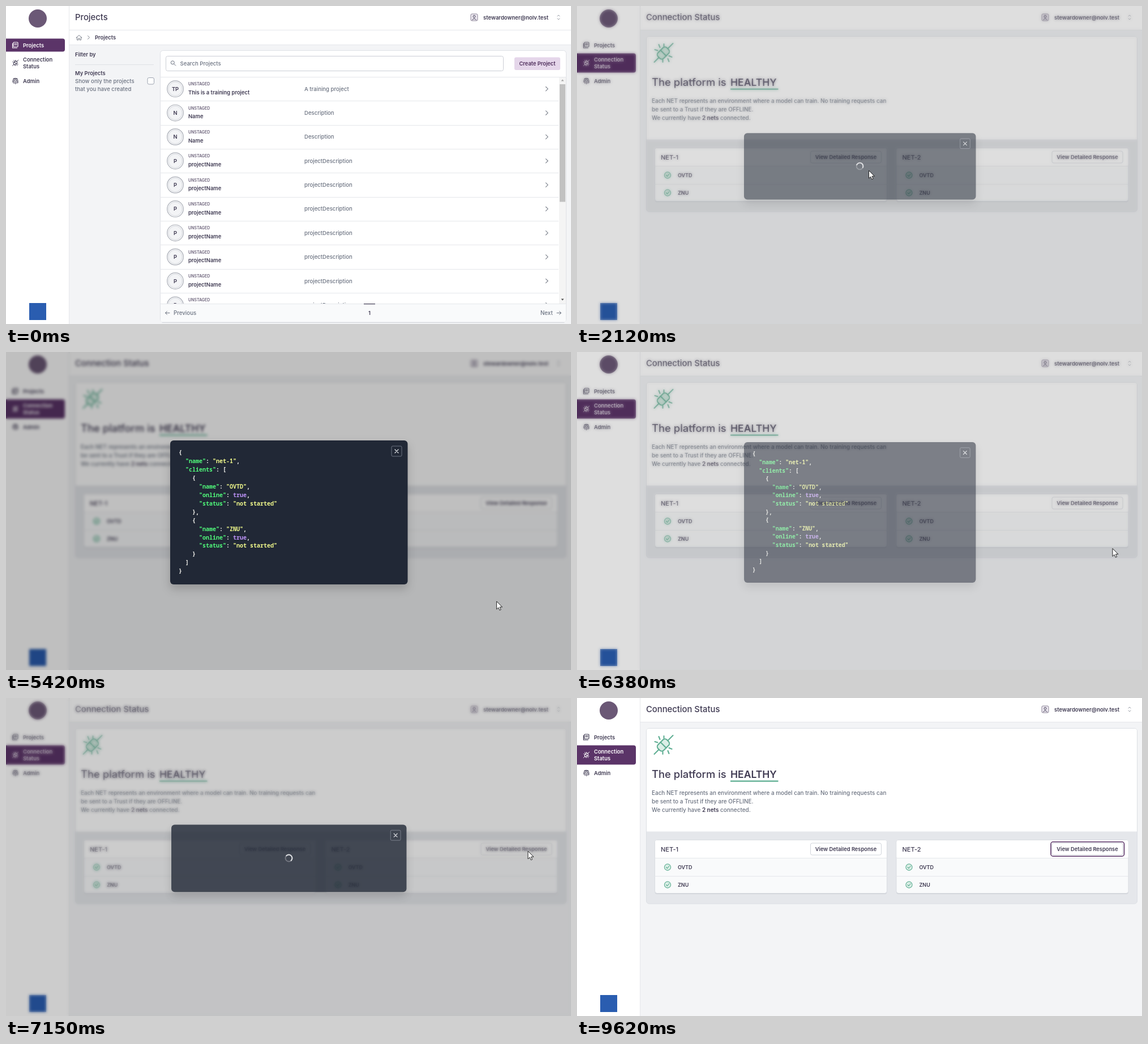
An HTML page for the animation above (9890 ms loop, 998 by 561 pixels).

```html
<!DOCTYPE html>
<html lang="en">
<head>
<meta charset="utf-8">
<title>Platform dashboard</title>
<style>
html, body { margin: 0; width: 100%; height: 100%; overflow: hidden; background: #f3f4f6; }
#stage { position: relative; width: 998px; height: 561px; overflow: hidden; }
#stage > * { position: absolute; left: 0; top: 0; width: 998px; height: 561px; }
svg { display: block; overflow: hidden; font-family: Inter, sans-serif; }
#shade { background: rgba(0, 0, 0, .25); backdrop-filter: blur(2.5px); }
#modal { transform-origin: 499.75px 282.75px; }
#box { filter: drop-shadow(0 8px 8px rgba(0, 0, 0, .18)); }
#json { font: 600 10px "Noto Sans Mono", monospace; white-space: pre; }
</style>
</head>
<body>
<div id="stage">
  <svg id="projects"></svg>
  <svg id="status"></svg>
  <div id="shade"></div>
  <svg id="modal"></svg>
  <svg id="pointer"></svg>
</div>
<script>
const LOOP = 9890;
const INK = '#3f3a52', GREY = '#6b7280', LINE = '#e5e7eb', PLUM = '#5b3468', GREEN = '#5fae93';
const $ = id => document.getElementById(id);

const rect = (x, y, w, h, fill, stroke = 'none', r = 0, extra = '') =>
  `<rect x="${x}" y="${y}" width="${w}" height="${h}" rx="${r}" fill="${fill}" stroke="${stroke}" ${extra}/>`;
const text = (x, y, str, size = 9.6, weight = 500, fill = GREY, anchor = 'start') =>
  `<text x="${x}" y="${y}" font-size="${size}" font-weight="${weight}" fill="${fill}" text-anchor="${anchor}">${str}</text>`;
const bold = (x, y, str, fill = INK, size = 9.4, anchor) => text(x, y, str, size, 600, fill, anchor);
const path = (d, stroke = GREY, w = 1, fill = 'none', extra = '') =>
  `<path d="${d}" stroke="${stroke}" stroke-width="${w}" fill="${fill}" stroke-linecap="round" stroke-linejoin="round" ${extra}/>`;
const circle = (x, y, r, fill, stroke = 'none', w = 1) =>
  `<circle cx="${x}" cy="${y}" r="${r}" fill="${fill}" stroke="${stroke}" stroke-width="${w}"/>`;
const hline = (x1, x2, y, stroke = LINE) => `<path d="M${x1} ${y}H${x2}" stroke="${stroke}"/>`;

function plug(x, y, scale, color, fill, w) {
  const rays = 'M-8-15l2 5M-15-6l5 1.500M1-16v4M8 10l2 5M10 5l5 2M-1 12v4';
  return `<g transform="translate(${x} ${y}) scale(${scale})">` +
    path('M-16 16L-8 8M8-8L17-17', color, w) + path(rays, color, w) +
    `<g transform="rotate(-45)">${rect(-11, -7, 22, 14, fill, color, 5, `stroke-width="${w}"`)}${path('M0-7V7', color, w)}</g></g>`;
}

function navItem(y, h, lines, active, icon, id = '') {
  const color = active ? '#fff' : INK;
  const back = active ? rect(-4, y, 108, h, PLUM, 'none', 4)
    : id ? rect(-4, y, 108, h, '#f0e8f2', 'none', 4, `id="${id}"`) : '';
  const mid = y + h / 2 + 3.5 - (lines.length - 1) * 5.75;
  return back + icon(color, y + h / 2) + lines.map((s, i) => bold(30, mid + i * 11.5, s, color)).join('');
}

const stackIcon = (c, y) => rect(13, y - 5, 8, 8, 'none', c, 1, 'stroke-width="1.2"') +
  path(`M11.500 ${y - 3}v8h8M15 ${y - 2.5}h4M15 ${y - .5}h4`, c, 1.1);
const plugIcon = (c, y) => plug(16.5, y, .31, c, 'none', 3.2);
const printIcon = (c, y) => path(`M12 ${y + 2}v-2a4.500 4.500 0 0 1 9 0v3M14 ${y + 4}v-4a2.500 2.500 0 0 1 5 0v4M16.500 ${y}v5M13 ${y - 4}q3.500-2 7 0`, c, 1.1);

function chrome(title, page) {
  return rect(0, 0, 998, 561, '#f3f4f6') + rect(0, 0, 998, 42, '#fff') + hline(111, 998, 42.5) +
    rect(0, 0, 111, 561, '#fff') + `<path d="M111.500 0V561" stroke="${LINE}"/>` +
    circle(56, 22, 16, '#6b5876') +
    navItem(57.5, 23, ['Projects'], page === 0, stackIcon) +
    navItem(83.5, 34, ['Connection', 'Status'], page === 1, plugIcon, 'hover') +
    navItem(121, 23, ['Admin'], false, printIcon) +
    rect(41, 524, 30, 30, '#2a5db0') +
    text(122, 25, title, 14.8, 500, INK) +
    rect(821, 14, 12, 12, '#ece8f0', '#8b8497', 2) + circle(827, 18.5, 2, 'none', INK) +
    path('M823.500 24.500q3.500-4.500 7 0', INK) +
    bold(843, 23.5, 'stewardowner@nolv.test', INK, 9.5) +
    path('M974 18l2-2 2 2M974 22l2 2 2-2', '#8b8f9a', .9);
}

function projectRow([initials, name, about], i) {
  const y = 146.2 + i * 42.35;
  return circle(299, y, 14.3, '#fff', '#a9adb6', 1.2) + circle(299, y, 12.2, '#f3f4f6', '#d3d6dc') +
    bold(299, y + 3.5, initials, INK, 9.4, 'middle') +
    bold(322, y - 6, 'UNSTAGED', '#6a6078', 7) + bold(322, y + 9.8, name) +
    text(527, y + 3.5, about) + path(`M953.500 ${y - 3.7}l3.700 3.700-3.700 3.700`, '#7b808b', 1.1) +
    hline(272, 976, Math.round(y + 21) + .5);
}

function projectsPage() {
  const rows = [['TP', 'This is a training project', 'A training project'],
    ...Array(2).fill(['N', 'Name', 'Description']),
    ...Array(7).fill(['P', 'projectName', 'projectDescription'])];
  return chrome('Projects', 0) +
    rect(112, 43, 886, 25, '#fff') + hline(112, 998, 68.5) +
    path('M124 56l5-4.500 5 4.500M125.500 55v5h2.500v-3h2v3h2.500v-5', '#7b808b') +
    path('M144.500 52.500l3 3-3 3', '#7b808b') + bold(157, 58.7, 'Projects') +
    bold(122, 88.7, 'Filter by') + hline(122, 261, 103.5, '#dfe1e6') +
    bold(122, 121.5, 'My Projects') + text(122, 136, 'Show only the projects') +
    text(122, 150, 'that you have created') + rect(250, 126.5, 11.5, 11.5, '#fff', '#9ca3af', 2.5) +
    rect(272.5, 78.5, 717, 479, '#fff', '#dfe1e6', 5) + path('M276 558.500H986', '#d5d8dd') +
    rect(282.5, 88.5, 596, 26, '#fff', '#cbced5', 3) +
    circle(294.3, 99.8, 3, 'none', GREY) + path('M296.700 102.200l3 3') +
    text(307.5, 105, 'Search Projects') +
    rect(898, 90.5, 81, 22.5, '#e5d6ea', 'none', 3) + bold(938.5, 104.7, 'Create Project', '#4c2b59', 9.3, 'middle') +
    hline(272, 990, 125.5) +
    `<clipPath id="list"><rect x="272" y="125" width="705" height="400"/></clipPath><g clip-path="url(#list)">` +
    rows.map(projectRow).join('') + '</g>' +
    rect(977, 126, 12, 399, '#f4f4f4') + rect(978, 138, 10, 207.5, '#c1c1c1') +
    path('M980.500 132.500h5l-2.500-3z', 'none', 0, '#a3a3a3') + path('M980.500 516.500h5l-2.500 3z', 'none', 0, '#505050') +
    rect(273, 525, 716, 32.5, '#f9fafb', 'none', 4) + hline(273, 989, 525.5) + rect(632, 525, 20, 1.2, INK) +
    path('M289 541.500h-7.500m3-3l-3 3 3 3') + text(296, 545, 'Previous', 9.7) +
    bold(642, 545, '1', INK, 9.4, 'middle') + text(944, 545, 'Next', 9.7) + path('M973 541.500h7.500m-3-3l3 3-3 3');
}

function netCard(x, name, ring) {
  const client = (y, label) => circle(x + 22.5, y, 5.6, '#dbeee6', GREEN, 1.1) +
    path(`M${x + 20} ${y}l2 2 3.200-4`, GREEN, 1.1) + bold(x + 40.5, y + 3.3, label, INK, 9);
  return rect(x, 251.5, 410, 94.5, '#cfd2d8', 'none', 4) +
    rect(x, 250.5, 410, 94, '#f9fafb', '#d9dce1', 4) + rect(x + .5, 251, 409, 31.5, '#fff', 'none', 3) +
    hline(x, x + 410, 282.5) + hline(x, x + 410, 314.5) +
    text(x + 10.5, 271, name, 11, 500, INK) +
    rect(x + 275, 256, 125, 21, '#fff', '#d1d5db', 3) +
    rect(x + 273, 253.8, 129.5, 25.4, 'none', PLUM, 4, `stroke-width="1.6" id="${ring}"`) +
    bold(x + 337.5, 269.8, 'View Detailed Response', INK, 9.3, 'middle') +
    client(298.5, 'OVTD') + client(329.5, 'ZNU');
}

function statusPage() {
  return chrome('Connection Status', 1) +
    rect(122.5, 53.5, 867, 309.5, '#e5e7eb', '#dcdfe4', 5) +
    path('M123 235.500V58q0-4 4-4H985q4 0 4 4V235.500z', 'none', 0, '#fff') +
    plug(152.5, 83, 1, GREEN, '#dbeee6', 2.1) +
    text(132, 141, 'The platform is', 18.4, 500, INK) + bold(271, 141, 'HEALTHY', INK, 17.5) +
    rect(271, 145.5, 84.5, 2.3, GREEN) +
    text(132, 171.4, 'Each NET represents an environment where a model can train. No training requests can', 9.95) +
    text(132, 186.2, 'be sent to a Trust if they are OFFLINE.', 9.95) +
    text(132, 201, `We currently have <tspan font-weight="600" fill="${INK}">2 nets</tspan> connected.`, 9.95) +
    netCard(137.5, 'NET-1', 'ring1') + netCard(564, 'NET-2', 'ring2');
}

function jsonText() {
  const client = (name, end) => ['    {', `      "name": "${name}",`, '      "online": true,',
    '      "status": "not started"', '    }' + end];
  const lines = ['{', '  "name": "net-<tspan id="netNo">1</tspan>",', '  "clients": [',
    ...client('OVTD', ','), ...client('ZNU', ''), '  ]', '}'];
  const tint = (s, color) => `<tspan fill="${color}">${s}</tspan>`;
  return lines.map((line, i) => {
    const body = line.trimStart(), x = 305 + 6 * (line.length - body.length);
    const [, key, rest] = body.match(/^("\w+")(:.*)$/) || [];
    const inner = !key ? body : tint(key, '#50fa7b') + rest
      .replace(/true/, m => tint(m, '#bd93f9'))
      .replace(/ "(net-.*<\/tspan>|[\w ]+)"/, m => tint(m, '#f1fa8c'));
    return `<text x="${x}" y="${181 + i * 14.95}" fill="#f8f8f2">${inner}</text>`;
  }).join('');
}

$('projects').innerHTML = projectsPage();
$('status').innerHTML = statusPage();
$('modal').innerHTML = rect(290, 156, 419.5, 254, '#212836', 'none', 6, 'id="box"') +
  `<g id="close">${rect(681, -9, 18, 18, 'none', '#6b7280', 2)}${path('M687-3l6 6m0-6l-6 6', '#e5e7eb', 1.2)}</g>` +
  `<g id="spin">${circle(0, 0, 6, 'none', 'rgba(255,255,255,.28)', 2)}${path('M-6 0A6 6 0 0 1 6 0', '#e8eaed', 2)}</g>` +
  `<g id="json">${jsonText()}</g>`;
$('pointer').innerHTML = `<g id="arrow">${path('M0 0V13.500L3.200 10.600 5.300 15.300 7.600 14.300 5.500 9.700H9.600z', '#222', 1, '#fff')}</g>`;

// time, x, y of the pointer tip
const MOVES = [[200, 951, 537], [1170, 62, 104], [1230, 62, 104], [1960, 503, 269], [2050, 505, 272],
  [2120, 515.5, 290.5], [3170, 557, 394], [4320, 557, 394], [4750, 941, 552], [5080, 941, 552],
  [6030, 688, 172], [6150, 688, 174], [6380, 946, 347], [6950, 922, 270.5], [7450, 922, 270.5],
  [7910, 752, 230], [8120, 752, 230], [8470, 689.5, 194], [9080, 690, 176], [9620, 690, 176]];
// dialog timing: opens, receives data, starts to close
const DIALOGS = [[2055, 3310, 6242], [7025, 7480, 9150]];

const unit = v => Math.max(0, Math.min(1, v));
const within = (t, a, b) => t >= a && t < b;
const show = (id, on) => { $(id).style.visibility = on ? 'inherit' : 'hidden'; };

function pointerAt(t) {
  const i = Math.max(1, MOVES.findIndex(m => m[0] > t));
  const [t0, x0, y0] = MOVES[i - 1], [t1, x1, y1] = MOVES[i];
  const u = unit((t - t0) / (t1 - t0)), e = u * u * (3 - 2 * u);
  return [x0 + (x1 - x0) * e, y0 + (y1 - y0) * e];
}

function drawDialog(t) {
  const n = DIALOGS.findIndex(d => within(t, d[0], d[2] + 200));
  const open = n >= 0;
  $('shade').style.display = $('modal').style.display = open ? 'block' : 'none';
  if (!open) return;
  const [start, data, end] = DIALOGS[n];
  const level = t < end ? 1 - (1 - unit((t - start) / 300)) ** 3 : 1 - unit((t - end) / 200) ** 2;
  $('shade').style.opacity = $('modal').style.opacity = level;
  $('modal').style.transform = `scale(${.95 + .05 * level})`;
  const loaded = t >= data, top = loaded ? 156 : 222.8;
  $('box').setAttribute('y', top);
  $('box').setAttribute('height', loaded ? 254 : 120);
  $('close').setAttribute('transform', `translate(0 ${top + 19})`);
  $('spin').setAttribute('transform', `translate(499.5 282.5) rotate(${(t - start) * .36})`);
  show('spin', !loaded);
  show('json', loaded);
  $('json').style.opacity = unit((t - data + 20) / 420);
  $('netNo').textContent = n + 1;
}

function draw() {
  const t = performance.now() % LOOP;
  show('projects', t < 1230);
  show('status', t >= 1230);
  show('hover', within(t, 1080, 1230));
  show('ring1', within(t, 6442, 7025));
  show('ring2', t >= 9350);
  drawDialog(t);
  show('pointer', within(t, 200, 9620));
  if (within(t, 200, 9620)) $('arrow').setAttribute('transform', `translate(${pointerAt(t)})`);
  requestAnimationFrame(draw);
}
draw();
</script>
</body>
</html>
```
